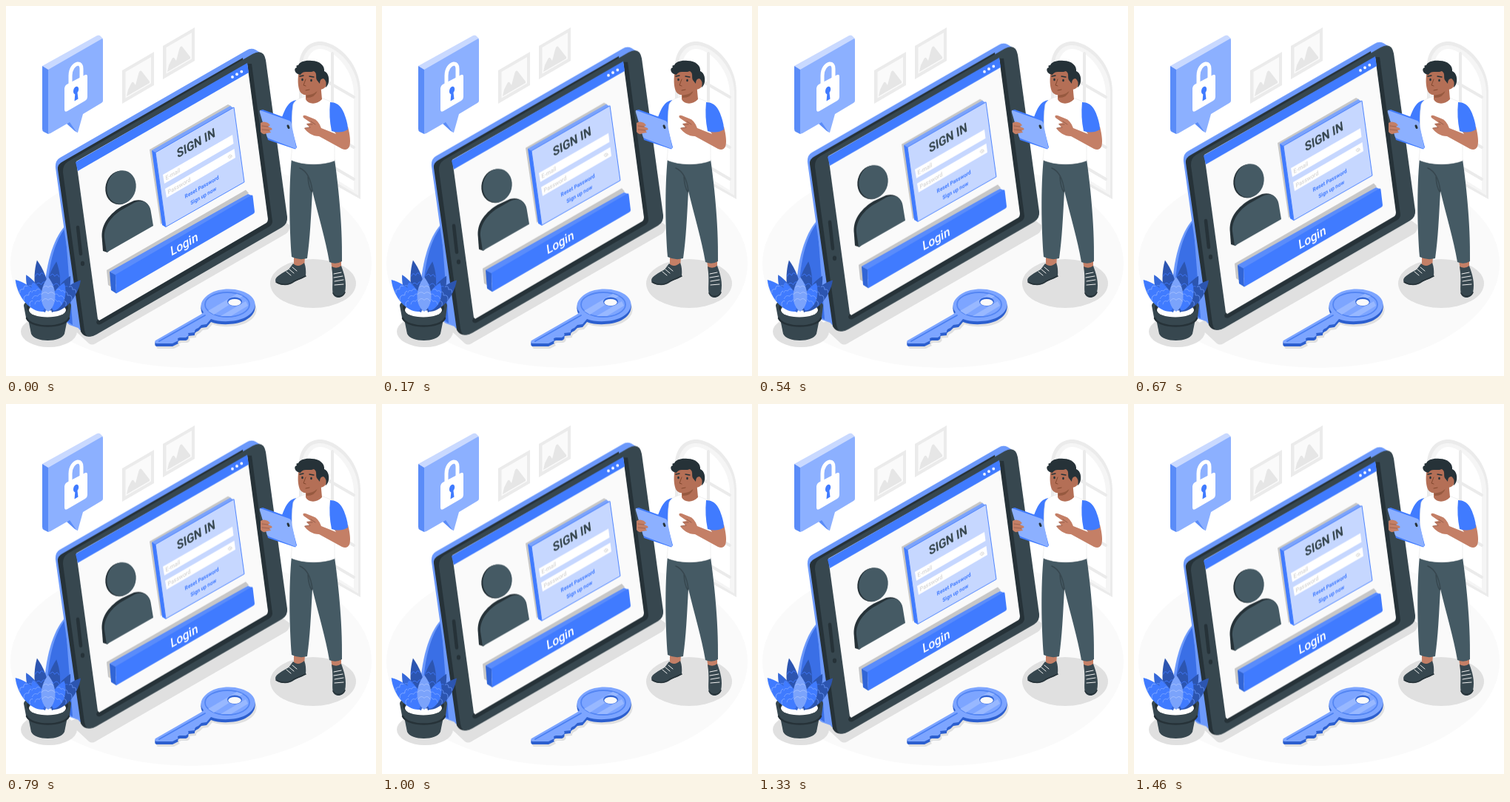
Recreate the animation shown at these times as an HTML page. Size 500 px wide and 500 px high, loop 1.5 s.

```html
<!DOCTYPE html>
<html lang="en">
<head>
<meta charset="utf-8">
<title>Sign in</title>
<style>
html, body { margin: 0; width: 100%; height: 100%; overflow: hidden; background: #fff; }
svg { display: block; width: 100%; height: 100%; }
text { font-family: Roboto, Inter, sans-serif; font-weight: 500; }
.float { animation: float 1.5s linear -40ms infinite; }
@keyframes float {
  0%, 100% { transform: translateY(.5px); }
  50% { transform: translateY(-9.5px); }
}
.blue { fill: #407bff; }
.light { fill: #8cb0ff; }
.dark { fill: #263238; }
.slate { fill: #37474f; }
.gray { fill: #455a64; }
.skin { fill: #c47f66; }
.face { fill: #b46f56; }
.shade { fill: #e0e0e0; }
.line { fill: none; stroke-linecap: round; stroke-linejoin: round; }
.mid { text-anchor: middle; }
</style>
</head>
<body>
<svg viewBox="0 0 500 500">
<defs>
  <g id="picture">
    <path fill="#ebebeb" d="M0 25 43 0V45L0 70Z"/>
    <path fill="#fafafa" d="M4.500 27 39 7V42.500L4.500 62.500Z"/>
    <path fill="#e6e6e6" d="M6 60 8 51 12 43Q14 39 16 42L18 45 22 30Q24 23 27 27L37 40V42Z"/>
  </g>
  <path id="leaf" d="M0 0C-13-10-15-38 0-60C15-38 13-10 0 0Z"/>
  <path id="veins" class="line" stroke-width=".8" d="M-9-18Q-5-26 0-20Q5-26 9-18M-10-30Q-5-37 0-31Q5-37 10-30M-7-42Q-4-47 0-42Q4-47 7-42"/>
  <path id="key" d="M263 417 202 452Q200 454 203 456L225 456 233 452Q230 449 235 448L243 448Q248 446 246 442L255 441Q254 437 260 435L264 431 271 430 277 423C290 428 310 427 323 421C337 414 341 401 331 392C319 381 291 379 275 389C264 396 260 406 267 414Z"/>
</defs>

<ellipse cx="250" cy="348" rx="244" ry="141" fill="#fafafa"/>
<use href="#picture" x="157" y="62"/>
<use href="#picture" x="212" y="29"/>

<!-- arched window -->
<path fill="#ebebeb" d="M396 215V78C398 57 411 47 427 48C454 52 479 82 479 115V261L452 246Z"/>
<path fill="#f5f5f5" d="M400 214V80C402 62 412 52 426 53C451 56 476 85 476 116V256L452 242Z"/>
<path fill="#fff" d="M405 214V84C406 67 415 57 426 58C447 61 470 89 470 118V249L452 238Z"/>
<path class="line" stroke="#ebebeb" stroke-width="4" d="M441 64V232M406 86 470 123M441 174 470 191M441 217 470 234"/>

<!-- speech bubble -->
<path fill="#c9d9ff" d="M49 81 123 40Q125 39 127 40L131 44 57 87Z"/>
<path fill="#5a8cf8" d="M49 81 57 86V173L51 170Q49 169 49 166Z"/>
<path fill="#5a8cf8" d="M82 159 91 153 97 171 93 169Z"/>
<path class="light" d="M57 86 130 44Q131 44 131 46V128Q131 130 129 131L104 146 97 171 95 170 86 157 60 172 57 173Z"/>
<path class="line" stroke="#fff" stroke-width="5" d="M87 106V94C87 85 92 79 97 78Q102 78 102 85V97"/>
<path fill="#fff" d="M82 106 107 93Q110 92 110 95V123Q110 126 107 128L83 142Q79 144 79 140V111Q79 108 82 106Z"/>
<path class="blue" d="M91 116C91 111 94 108 96.500 109C99 110 98.500 115 96.500 117L97.500 125.500 92.500 128.500 93.300 119.500Q91 118.500 91 116Z"/>

<!-- ground shadows -->
<path class="shade" d="M84 430 112 456Q116 459 121 456L378 308Q384 304 383 296L375 290Z"/>
<ellipse class="shade" cx="58" cy="440" rx="38" ry="21"/>
<ellipse class="shade" cx="415" cy="375" rx="58" ry="33"/>

<g class="float">
  <!-- stand -->
  <path fill="#6c99fb" d="M79 298C64 315 52 350 51 402L86 431 103 437Z"/>
  <path fill="#3a6fe6" d="M80 300C66 318 55 352 55 408L90 431Z"/>
  <!-- case -->
  <path fill="#6c99fb" d="M73 205 325 60Q331 56 337 59L345 64 120 420 103 439Q98 438 97 433L67 219Q66 209 73 205Z"/>
  <path class="dark" d="M77 210 320 70 350 292 116 446Q106 449 101 440L70 221Q69 214 77 210Z"/>
  <path class="slate" d="M84 210 333 65Q348 57 351 73L380 285Q381 294 373 299L122 444Q108 452 106 438L77 225Q76 215 84 210Z"/>
  <path class="dark" d="M326 78 332 78 360 291Q360 295 356 298L128 430Q123 432 122 427Z"/>
  <path fill="#fafafa" d="M95 210 326 78 354 288Q354 291 352 293L126 425 124 423Z"/>
  <path class="blue" d="M94 211 326 77 328 90 97 223Z"/>
  <g fill="#fff">
    <circle cx="306" cy="96" r="1.900"/>
    <circle cx="312" cy="92.300" r="1.900"/>
    <circle cx="318.300" cy="88.700" r="1.900"/>
  </g>
  <path class="line" stroke="#263238" stroke-width="4.500" d="M97 299 101 335"/>
  <ellipse class="dark" cx="103.500" cy="348" rx="2.600" ry="3.300"/>

  <!-- user -->
  <ellipse class="dark" cx="154" cy="245.500" rx="19.500" ry="23" transform="rotate(14 154 245.500)"/>
  <ellipse class="gray" cx="156" cy="245" rx="19.500" ry="23" transform="rotate(14 156 245)"/>
  <path class="dark" d="M131 331 129.500 311C129 294 141 280 156 271L173 263C185 260 193 266 195 276L137 333Z"/>
  <path class="gray" d="M136 333 133 313C132 297 144 282 159 274L173 266C186 260 195 267 196 279L199 297Z"/>

  <!-- form -->
  <path fill="#c7c7c7" d="M194 194 300 133 304 135 290 229 209 295Z"/>
  <path fill="#7ba3fb" d="M197 195 303 135 308 138 202 199Z"/>
  <path class="blue" d="M197 195 202 198 216 299 211 296Z"/>
  <path fill="#c6d7ff" stroke="#407bff" stroke-width=".9" stroke-linejoin="round" d="M202 198 308 137 322 238 216 298.500Z"/>
  <path fill="#fff" d="M212 228 306 174 307.500 186 214 240Z"/>
  <path fill="#fff" d="M215 247 308.500 193 310 205 217 259Z"/>
  <g class="line" stroke="#d6d6d6" stroke-width=".8">
    <ellipse cx="302.700" cy="203.500" rx="2.600" ry="2" transform="rotate(-30 302.700 203.500)"/>
    <circle cx="302.700" cy="203.500" r=".6"/>
  </g>
  <text class="mid slate" style="font-weight:600" font-size="16.800" transform="matrix(.866 -.5 .13 1 257.500 191)">SIGN IN</text>
  <g fill="#d6d6d6" font-size="8">
    <text transform="matrix(.866 -.5 .14 1 216 235.500)">E-mail</text>
    <text transform="matrix(.866 -.5 .14 1 219 254.500)">Password</text>
  </g>
  <g class="blue mid" font-size="7.300" style="font-weight:600">
    <text style="font-weight:inherit" transform="matrix(.866 -.5 .14 1 265 247)">Reset Password</text>
    <text style="font-weight:inherit" transform="matrix(.866 -.5 .14 1 267 259)">Sign up now</text>
  </g>

  <!-- button -->
  <path fill="#c7c7c7" d="M136 357 324 248.500 328 253 143 380 138 377Z"/>
  <path fill="#5a8cfb" d="M140 359 327 254 333 256.500 148 364Z"/>
  <path fill="#3165d6" d="M140 359 148 363.500 149 388.500 142 384Z"/>
  <path class="blue" d="M148 363 331 256Q333 255 333.500 257L336 278Q336 280 334 281L149 388.500Z"/>
  <text class="mid" fill="#fff" font-size="17" transform="matrix(.866 -.5 .13 1 241.500 327.500)">Login</text>
</g>

<!-- key -->
<use href="#key" y="7" x="2" class="shade"/>
<use href="#key" y="4" fill="#2c5fcf"/>
<use href="#key" y="2" fill="#2c5fcf"/>
<use href="#key" fill="#7da5ff"/>
<ellipse class="line" cx="299" cy="403.500" rx="30" ry="16.500" stroke="#5486f3" stroke-width="1.800"/>
<path fill="#98b8ff" d="M273 412 312 389 320 392 281 417ZM290 419 324 399 327 405 304 419Z"/>
<ellipse cx="309" cy="399.500" rx="10" ry="6" fill="#3165d6"/>
<ellipse cx="309" cy="400.500" rx="8.700" ry="4.500" fill="#fafafa"/>
<path class="line" stroke="#4b80f2" stroke-width="1.800" d="M207 453 269 418"/>

<!-- plant -->
<path class="slate" d="M29 418 34 443C39 455 74 455 79 443L84 418Z"/>
<path class="slate" d="M24 405C24 391 88 391 88 405L86 421C80 436 32 436 27 421Z"/>
<path class="line" stroke="#263238" stroke-width="2.500" d="M28 422C34 436 79 436 85 422"/>
<ellipse cx="56" cy="408" rx="28" ry="12.500" class="dark"/>
<ellipse cx="56" cy="411" rx="25" ry="9.500" fill="#fff"/>
<g id="plant"></g>

<!-- man -->
<path class="skin" d="M389 338H404L403 354 389 355ZM439 344H453L453 358 441 358Z"/>
<path class="slate" d="M388 348C393 353 399 351 403 347Q406 354 405 365C400 370 394 369 388 374C382 379 366 378 364 371C364 365 374 361 382 356Z"/>
<path class="slate" d="M440 352Q447 356 453 351C457 362 461 374 458 387C456 396 444 396 442 389C440 380 443 372 440 352Z"/>
<path class="line" stroke="#263238" stroke-width="1.600" d="M365 373C373 378 383 377 389 372L405 365M442 388C445 394 455 394 458 387"/>
<path class="line" stroke="#f0f0f0" stroke-width="1" d="M379 359 385 364M383 356 389 361M387 353 393 358M443 362 453 360M443 367 455 365M444 372 456 370M444 377 456 376"/>
<path class="gray" d="M386 205 444 207C448 235 455 292 454 345Q446 350 437 346C432 316 422 283 414 250C412 286 411 313 407 341Q396 344 386 339C383 300 382 247 386 205Z"/>
<path class="line" stroke="#37474f" stroke-width="1.500" d="M397 219Q411 225 414 250M413 251Q409 245 408 231"/>
<path class="skin" d="M376 147 389 156 379 176 349 172 347 160 366 163Z"/>
<path class="blue" d="M392 127C381 129 377 140 373 150L387 163Z"/>
<path fill="#fff" stroke="#e6e6e6" stroke-width=".6" d="M405 122C397 125 391 126 388 133C384 157 389 178 385 208C402 216 430 215 444 209C444 180 444 155 441 130L426 124Z"/>
<path class="face" d="M405 112 425 104 427 126C420 134 408 133 405 126Z"/>
<path fill="#96593f" d="M406 119Q414 120 421 114 418 124 406 124Z"/>
<path class="face" d="M396 87C394 97 394 108 397 115C400 122 412 122 419 116L425 113Q434 111 433 103C432 95 427 95 425 99L421 83Z"/>
<path class="dark" d="M398 93C390 92 388 84 393 83Q391 80 395 80C397 75 405 73 413 74C424 74 431 81 430 88C438 91 438 106 432 110Q434 101 429 98 424 98 424 105L420 100C418 96 421 91 416 88C409 91 402 86 398 93Z"/>
<g class="line" stroke="#263238">
  <path stroke-width="1.300" d="M397 95 402 94M410 95 416 96"/>
  <path stroke-width="1" stroke="#83492f" d="M405 99 402 107 405 108M405 114 410 113"/>
  <path stroke-width="2.400" d="M400.500 99V100M412.500 100V101"/>
</g>
<path class="skin" d="M440 164 462 163C465 175 466 185 464 190Q461 196 454 193L423 176C414 176 407 171 403 165L410 164 406 159 412 158 402 151Q400 147 405 148L415 152Q422 154 426 165L446 173Z"/>
<path class="line" stroke="#8d5847" stroke-width=".8" d="M404 165 411 164M407 160 414 160M412 156 418 160"/>
<path class="blue" d="M438 130C451 130 456 141 459 151Q462 160 462 167 452 173 440 169 436 150 438 130Z"/>
<path class="blue" d="M343 141 347 140 383 153 393 191 391 193.500 354 181Z"/>
<path class="light" d="M345 141.500 383 155Q385 156 385.500 158L392 190Q393 194 389 192L355 179Q353 178 352.500 176L343 144Q342 140 345 141.500Z"/>
<path class="line" stroke="#263238" stroke-width="3" d="M381 162 382 164.500"/>
<path class="skin" d="M344 158Q348 155 354 158L357 161 354 163 359 165Q361 168 356 168L358 171 352 172Q347 175 344 170Z"/>
<path class="line" stroke="#8d5847" stroke-width=".7" d="M346 162 354 163M346 167 356 168"/>
</svg>
<script>
// base x, base y, angle, width scale, length scale, fill, vein colour
const leaves = [
  [54, 412, -10, .85, 1.16, '#2c55b0', '#407bff'],
  [60, 412, 7, .85, 1.12, '#2c55b0', '#407bff'],
  [53, 414, -27, .8, .95, '#3568d8', '#6c99fb'],
  [62, 414, 27, .8, .92, '#2c55b0', '#407bff'],
  [50, 413, -41, .95, .95, '#407bff', '#8cb0ff'],
  [64, 413, 41, .85, .94, '#2c55b0', '#6c99fb'],
  [50, 412, -20, .8, .68, '#407bff', '#8cb0ff'],
  [64, 412, 21, .8, .68, '#407bff', '#8cb0ff'],
  [57, 413, 0, .9, .78, '#7ba3fb', '#b3caff']
];
document.getElementById('plant').innerHTML = leaves.map(([x, y, a, w, h, fill, vein]) =>
  `<g transform="translate(${x} ${y}) rotate(${a}) scale(${w} ${h})">
    <use href="#leaf" fill="${fill}"/><use href="#veins" stroke="${vein}"/></g>`).join('');
</script>
</body>
</html>
```
